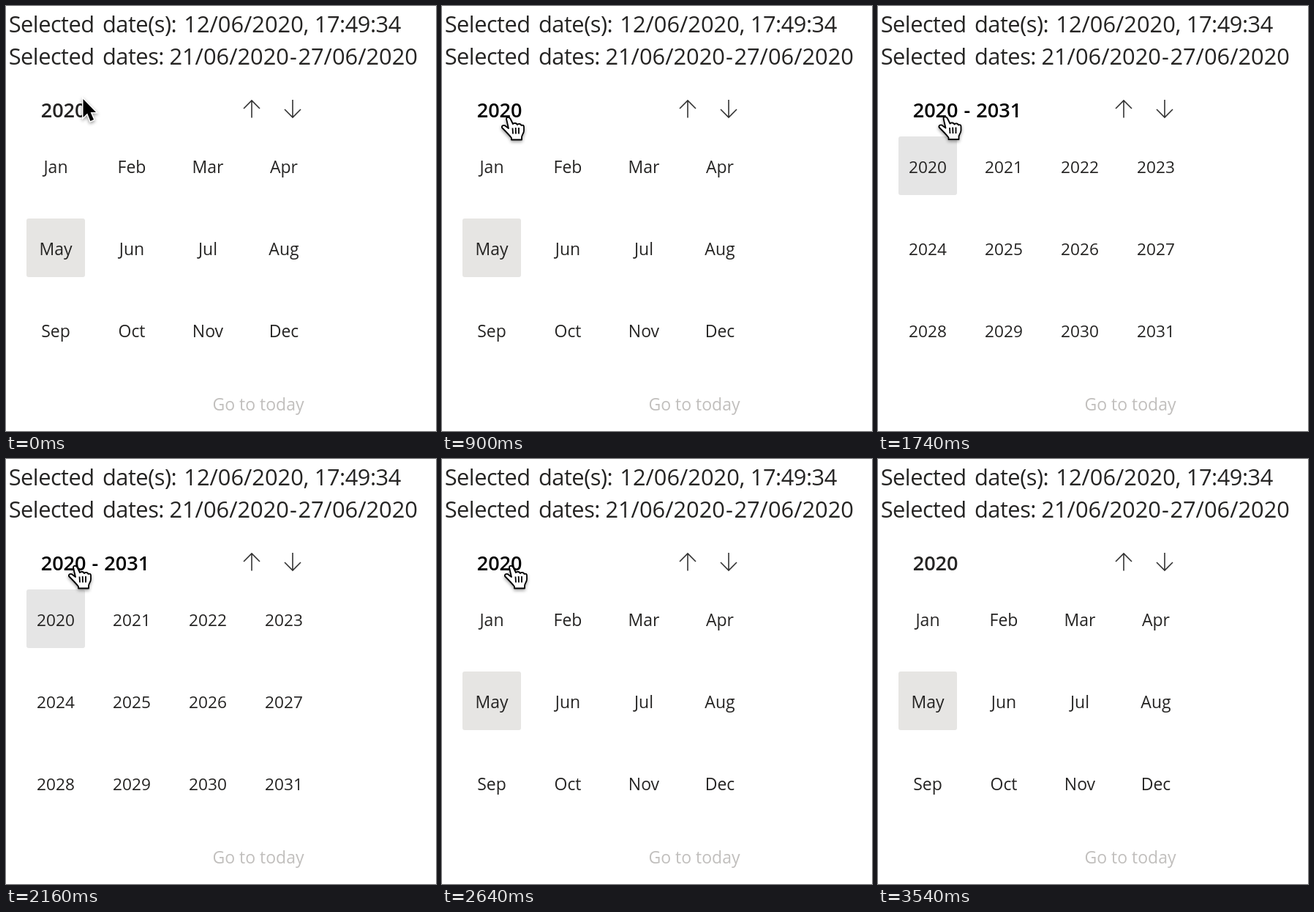
These frames come from a looping animation (588 by 580 pixels, 3.6 s). An HTML page:

```html
<!DOCTYPE html>
<html lang="en">
<head>
<meta charset="utf-8">
<title>Month and year picker</title>
<style>
html, body { margin: 0; width: 100%; height: 100%; overflow: hidden; background: #fff; }
svg { display: block; width: 588px; height: 580px; font: 23px "Open Sans", "Noto Sans", sans-serif; fill: #252423; }
.info { font-size: 30.8px; }
.label { letter-spacing: -.5px; }
#title { font-size: 27.1px; font-weight: 600; word-spacing: 1px; }
.cell { text-anchor: middle; }
.years .cell { font-size: 22.65px; }
.arrows { fill: none; stroke: #333; stroke-width: 1.6; }
.cursor { filter: drop-shadow(0 2px 2px #0006); }
</style>
</head>
<body>
<svg viewBox="0 0 588 580">
  <g class="info">
    <g class="label">
      <text x="3.7" y="36">Selected</text><text x="132" y="36">date(s):</text>
      <text x="3.7" y="80">Selected</text><text x="132" y="80">dates:</text>
      <text x="421.8" y="36">17:49:34</text>
    </g>
    <text x="243.3" y="36">12/06/2020,</text>
    <text x="223.4" y="80">21/06/2020</text><text x="388" y="80">-</text><text x="399.4" y="80">27/06/2020</text>
  </g>
  <text id="title" x="47.7" y="152"></text>
  <path class="arrows" d="M336 152.5V129M325 140l11-11 11 11M392 128V152M381 141l11 11 11-11"/>
  <rect id="box" x="28" width="80" height="80" rx="3"/>
  <g id="grid"></g>
  <text x="282.5" y="552" fill="#c1bfbd">Go to today</text>
  <g id="arrow" class="cursor">
    <path d="M.5 1V26L6.2 20.5 10.4 31 15 29 10.6 19H18Z" fill="#000" stroke="#fff" stroke-width="3" paint-order="stroke"/>
  </g>
  <g id="hand" class="cursor" fill="#fff" stroke="#000" stroke-width="1.8" stroke-linejoin="round">
    <path d="M1 3C1 0 5 0 6.5 3L10 10C12 8 15 9 16 11 18 9 21 10 21.5 12 23.5 11 25 12 25 14V19C25 23 22 25 22 28V31.5H8V29C5 25-1 19-5 15-6 12-2 11 0 13L4 16Z"/>
    <path d="M9.5 15.5l.5 8M13.7 15l.3 8.5M18 15v8.5" fill="none"/>
  </g>
</svg>
<script>
const $ = id => document.getElementById(id);
const LOOP = 3600, STEP = 60;
const months = "Jan Feb Mar Apr May Jun Jul Aug Sep Oct Nov Dec".split(" ");
const years = months.map((_, i) => 2020 + i);

const cells = months.map((_, i) => {
  const cell = document.createElementNS("http://www.w3.org/2000/svg", "text");
  cell.setAttribute("class", "cell");
  cell.setAttribute("x", 68 + 104 * (i % 4));
  cell.setAttribute("y", 228 + 112 * Math.floor(i / 4));
  return $("grid").appendChild(cell);
});

// [time, x, y] of the cursor's tip
const path = [
  [0, 105, 126], [60, 98, 137], [180, 90, 148], [360, 87, 151], [1680, 87, 151],
  [1740, 88.5, 150.5], [2160, 91, 145], [3000, 91, 145],
  [3060, 95, 206], [3180, 100, 385], [3240, 102, 455]
];

function tipAt(t) {
  const i = path.findIndex(p => p[0] >= t);
  if (i < 1) return path[0].slice(1);
  const [t0, x0, y0] = path[i - 1], [t1, x1, y1] = path[i];
  const k = (t - t0) / (t1 - t0);
  return [x0 + (x1 - x0) * k, y0 + (y1 - y0) * k];
}

function showPicker(byYear) {
  $("grid").setAttribute("class", byYear ? "years" : "");
  $("title").textContent = byYear ? "2020 - 2031" : "2020";
  $("box").setAttribute("y", byYear ? 178 : 290);
  $("box").setAttribute("fill", byYear ? "#e5e5e5" : "#e6e5e3");
  cells.forEach((cell, i) => cell.textContent = (byYear ? years : months)[i]);
}

let shown;
function draw(now) {
  const t = Math.floor(now % LOOP / STEP) * STEP;
  const byYear = t >= 960 && t < 2220;
  if (byYear !== shown) showPicker(shown = byYear);

  const pointing = t >= 60 && t < 3060;
  const visible = t <= 3240;
  $("title").setAttribute("fill", t >= 60 && t <= 3060 ? "#000" : "#252423");
  $("hand").style.display = pointing ? "" : "none";
  $("arrow").style.display = visible && !pointing ? "" : "none";
  if (visible) {
    const at = `translate(${tipAt(t)})`;
    $("hand").setAttribute("transform", at);
    $("arrow").setAttribute("transform", at);
  }
}

const start = performance.now();
function frame() {
  draw(performance.now() - start);
  requestAnimationFrame(frame);
}
frame();
</script>
</body>
</html>
```
